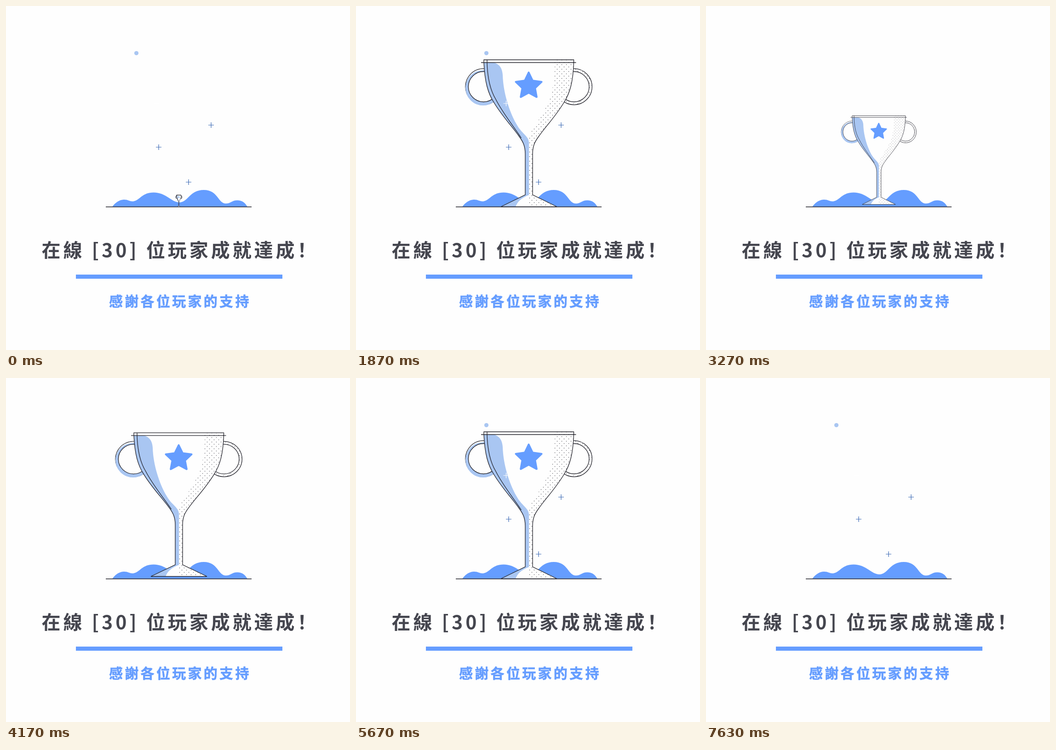
Recreate the animation shown at these times as an HTML page. Size 748 px wide and 748 px high, loop 7.66 s.

```html
<!DOCTYPE html>
<html lang="zh-CN">
<head>
<meta charset="utf-8">
<style>
  html, body { margin: 0; width: 100%; height: 100%; overflow: hidden; background: #fefefe; }
  svg { display: block; width: 100%; height: 100%; }
  text { font-family: "Noto Sans CJK SC", "Noto Sans CJK TC", "Noto Sans CJK", sans-serif; font-weight: 700; }
  .line { fill: none; stroke: #24242c; }
  .blue { fill: #659dff; }
  .pale { fill: #a9c6f2; }
  .paper { fill: #fefefe; }
</style>
</head>
<body>
<svg viewBox="0 0 748 748">
  <defs>
    <pattern id="dots" width="10" height="10" patternUnits="userSpaceOnUse">
      <circle cx="2.5" cy="2.5" r=".8" fill="#44444c"/>
      <circle cx="7.5" cy="7.5" r=".8" fill="#44444c"/>
    </pattern>
    <path id="cup" d="M278 117V123C280 165 287 190 300 210C318 240 338 260 355 284C364 296 368 306 368 322V410.5L315 436.5H437L384 410.5V322C384 306 388 296 397 284C414 260 434 240 452 210C465 190 472 165 473.5 123V117Z"/>
    <clipPath id="inside"><use href="#cup"/></clipPath>
  </defs>

  <path class="blue" d="M231 436.5C238 427 247 421 257 421C267 421 269 426 278 424.5C291 422 296 405.5 321 405.5C348 405.5 360 427 377 427C396 427 399 400 430 400C461 400 461 429.5 478 429.5C489 429.5 491 422.5 503 422.5C514 422.5 520 428 525 436.5Z"/>
  <path class="line" stroke-width="1.4" d="M217 436.7H534"/>

  <g id="trophy">
    <circle class="line" cx="277.3" cy="175.5" r="39.3"/>
    <circle class="paper" cx="277.3" cy="175.5" r="38.6"/>
    <circle class="pale" cx="276.3" cy="178" r="38.3"/>
    <circle class="paper" cx="277.3" cy="175.5" r="33"/>
    <circle class="line" cx="277.3" cy="175.5" r="33"/>
    <circle class="paper" cx="474" cy="175.5" r="39.3"/>
    <circle cx="474" cy="175.5" r="36" fill="none" stroke="url(#dots)" stroke-width="6"/>
    <circle class="line" cx="474" cy="175.5" r="39.3"/>
    <circle class="line" cx="474" cy="175.5" r="33"/>
    <use href="#cup" class="paper"/>
    <g clip-path="url(#inside)">
      <path class="pale" d="M270 123H300C313 127 318 136 319 150C320 190 335 235 352 262C362 278 376 284 376 297V411C360 417 351 425 347 437H300V330Z"/>
      <path fill="url(#dots)" d="M432 117C434 170 423 205 405 235C393 256 376 275 376 292V437H440V330L480 230V117Z"/>
    </g>
    <use href="#cup" class="line"/>
    <path class="line" d="M272 123H478.5M285 117V123C286 160 293 185 304 203C318 231 342 261 359.5 287"/>
    <path id="star" class="blue" stroke="#659dff" stroke-width="4" stroke-linejoin="round"/>
  </g>
  <g id="sparks"></g>

  <text x="77.5" y="546" font-size="41" letter-spacing="5.93" fill="#45464f">在線 [30] 位玩家成就達成！</text>
  <rect class="blue" x="152" y="584" width="449" height="9"/>
  <text x="224" y="653" font-size="30" letter-spacing="4.3" class="blue" stroke="#659dff" stroke-width=".6">感謝各位玩家的支持</text>
</svg>
<script>
  const CYCLE = 3830, TWINKLE = CYCLE / 2, GROUND = 436.5, AXIS = 375.75;
  const trophy = document.getElementById('trophy');
  const sparkLayer = document.getElementById('sparks');

  const starPoint = (_, i) => {
    const angle = i * Math.PI / 5, radius = i % 2 ? 14.5 : 29.5;
    return [375.5 + radius * Math.sin(angle), 174 - radius * Math.cos(angle)].map(v => v.toFixed(2));
  };
  document.getElementById('star').setAttribute('d', 'M' + Array.from({ length: 10 }, starPoint).join('L') + 'Z');

  // x, y, kind, moment of full visibility
  const sparks = [
    [283.5, 102.5, 'dot', 0], [326.5, 212, 'white', 0], [446, 259, 'plus', 0],
    [332, 307, 'plus', 0], [397, 383, 'plus', 0],
    [422, 142, 'plus', 957], [305, 160, 'white', 957], [278, 233.5, 'dot', 957]
  ].map(([x, y, kind, peak]) => {
    const isDot = kind === 'dot';
    const node = document.createElementNS('http://www.w3.org/2000/svg', isDot ? 'circle' : 'path');
    if (isDot) {
      node.setAttribute('r', 4.6);
      node.setAttribute('fill', '#a9c6f2');
    } else {
      node.setAttribute('d', 'M-6 0H6M0 -6V6');
      node.setAttribute('stroke', kind === 'white' ? '#fff' : '#3a68b4');
      node.setAttribute('stroke-width', 1.2);
    }
    sparkLayer.append(node);
    return { x, y, isDot, peak, node };
  });

  // Smooth interpolation through [time, value] keys
  function track(keys, t) {
    const next = keys.findIndex(key => key[0] > t);
    if (next < 0) return keys[keys.length - 1][1];
    const [t0, a] = keys[next - 1], [t1, b] = keys[next];
    return a + (b - a) * (1 - Math.cos(Math.PI * (t - t0) / (t1 - t0))) / 2;
  }

  const scaleX = [[0, .05], [230, 1.04], [340, 1], [600, 1], [2700, 1], [2920, 1.04], [3270, .593], [3480, 0]];
  const scaleY = [[0, .08], [220, 1.03], [350, .977], [470, 1.008], [600, 1], [2700, 1], [2920, 1.02], [3270, .604], [3480, 0]];
  const lift = [[0, 0], [220, -7], [340, -5], [470, 0], [2700, 0], [2920, -5], [3270, -5], [3480, 0]];

  function render(time) {
    const t = time % CYCLE;
    const sx = track(scaleX, t), sy = track(scaleY, t);
    trophy.setAttribute('visibility', sx > .01 ? 'visible' : 'hidden');
    trophy.setAttribute('transform',
      `translate(${AXIS} ${GROUND + track(lift, t)}) scale(${sx} ${sy}) translate(${-AXIS} ${-GROUND})`);
    trophy.setAttribute('stroke-width', Math.max(1.3, .6 / Math.max(sx, .01)));

    for (const { x, y, isDot, peak, node } of sparks) {
      const phase = (t - peak + CYCLE) % TWINKLE;
      const distance = Math.min(phase, TWINKLE - phase);
      const show = Math.min(1, Math.max(0, (315 - distance) / 60));
      node.setAttribute('transform', `translate(${x} ${y}) scale(${isDot ? show * show : 1})`);
      node.setAttribute('opacity', isDot ? 1 : show);
    }
  }

  const start = performance.now();
  function tick() {
    render(performance.now() - start);
    requestAnimationFrame(tick);
  }
  tick();
</script>
</body>
</html>
```
